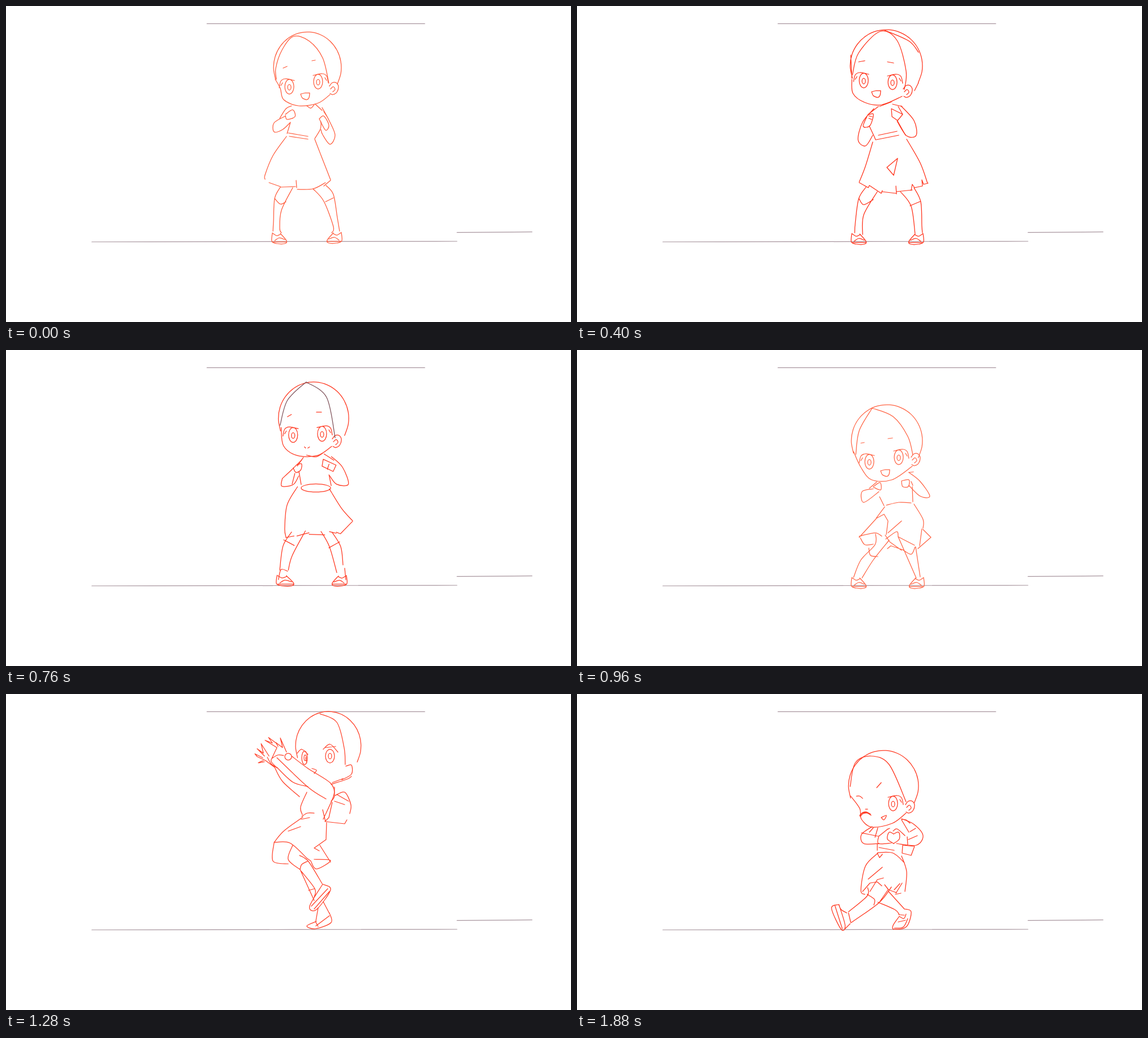
Write an HTML page that moves like this. It is 1001x560 px and loops after 1.92 s.

```html
<!DOCTYPE html>
<html lang="en">
<head>
<meta charset="utf-8">
<title>Dance sketch</title>
<style>
html, body { margin: 0; width: 100%; height: 100%; overflow: hidden; background: #fff; }
svg { display: block; width: 100%; height: 100%; }
path { fill: none; stroke-linecap: round; stroke-linejoin: round; }
#girl path { stroke-width: 1.25; vector-effect: non-scaling-stroke; }
#guides { stroke: #a8959e; stroke-width: 1.2; }
</style>
</head>
<body>
<svg viewBox="0 0 1001 560">
  <path id="guides" d="M356 31.3H742M152 418L799 417M799 401.3L932 400.3"/>
  <g id="girl"></g>
</svg>
<script>
// Strokes are split by "|": a smooth curve through points,
// "^" for straight segments, "o" for an ellipse (cx cy rx ry).
const EYE = '-18 2 -15 -10 -7 -14 9 -11|-15 -2 -12 -7|o0 0 8 13|o0 1 3 5';
const EAR = '-8 -5 -3 -11 4 -11 8 -4 5 6 -2 10 -7 8|-6 0 -1 -4 2 1 -2 5';
const MOUTH = '^-8 0 0 -2 8 -2|8 -2 7 6 3 10 -5 7 -8 0';
const SHOE = '0 -19 -1 -4 8 0 22 0 25 -5 14 -18|1 -18 8 -14 15 -17|1 -3 25 -3|4 -5 12 -10 22 -7';

const place = (spec, dx, dy, flip = 1) => spec.split('|').map(stroke => {
  let n = 0;
  return stroke.replace(/-?[\d.]+/g, v => {
    const i = n++;
    if (stroke[0] === 'o' && i > 1) return v;
    return i % 2 ? +v + dy : v * flip + dx;
  });
}).join('|');

// Skull outline, open at the jaw.
function dome(cx, cy, rx, ry) {
  const pts = [];
  for (let deg = 28; deg >= -200; deg -= 19) {
    const a = deg * Math.PI / 180;
    pts.push((cx + rx * Math.cos(a)).toFixed(1), (cy + ry * Math.sin(a)).toFixed(1));
  }
  return pts.join(' ');
}

const parts = ['head', 'hair', 'face', 'torso', 'armL', 'armR', 'skirt', 'legL', 'legR'];

class Pose {
  constructor(ink, hairInk = ink) { Object.assign(this, { ink, hairInk }); }
  add(part, ...specs) { this[part] = specs.join('|'); }
}

const wide = new Pose('#ff5c3c');
wide.add('head', dome(534, 109, 60, 63), '477 130 486 146 492 166 519 177 553 172 574 157', place(EAR, 581, 147));
wide.add('hair', '479 130 478 110 489 78 509 54 537 62 561 92 572 137');
wide.add('face', place(EYE, 502, 143), place(EYE, 553, 134, -1), place(MOUTH, 530, 156), '491 110 498 107|542 97 548 96');
wide.add('torso', '533 177 540 181 546 175|548 174 560 185|504 206 498 226|558 205 557 218 547 235|500 225 535 231|502 231 535 236');
wide.add('armL', '506 177 496 182 485 199|495 195 475 207 475 223 490 219 503 207|495 194 498 201 512 196 508 184 495 192');
wide.add('armR', '560 180 573 204 583 229 574 245 561 228 558 219|555 200 563 195 572 211 566 220 555 200|563 187 570 198');
wide.add('skirt', '497 231 473 265 459 299 459 307|466 313 486 320|486 321 513 320|514 309 515 322|516 325 544 324 566 313|563 319 575 309|547 236 559 267 575 308');
wide.add('legL', '486 321 476 341 474 380 473 399|508 322 488 362 485 394 488 402|476 341 486 351 496 347', place(SHOE, 472, 421));
wide.add('legR', '567 318 580 334 587 375 591 399|544 324 563 346 580 391 577 402|566 347 580 340', place(SHOE, 594, 420, -1));

const sway = new Pose('#ff3018');
sway.add('head', dome(548, 106, 64, 64), '487 130 489 155 510 171 540 175 576 160', place(EAR, 586, 152), '605 136 598 150|487 128 485 87|545 43 588 62 605 82');
sway.add('hair', '488 122 499 83 537 45 567 61 583 115 580 148');
sway.add('face', place(EYE, 508, 132), place(EYE, 559, 135, -1), place(MOUTH, 530, 152), '499 99 510 97|550 99 561 101');
sway.add('torso', '536 178 557 170|559 174 576 178|534 178 516 192|518 213 526 230 529 237|568 204 582 229|534 229 567 222|530 237 570 229');
sway.add('armL', '526 182 506 206 498 237 511 248 524 229|515 193 507 213 519 212 525 192 516 193|517 195 523 196|517 199 522 201');
sway.add('armR', '574 177 597 203 601 229 584 230 567 204|^557 182 577 192 568 203 558 196 557 182|569 178 577 192');
sway.add('skirt', '524 241 511 284 500 312|^500 313 516 322 518 318 539 332 541 327|540 329 565 332|565 319 566 333|566 329 594 326|^592 327 594 316 598 322 612 319 611 308 614 316 622 314|584 236 608 278 621 314|^568 270 549 286 561 300 568 270');
sway.add('legL', '512 321 499 342 493 385 492 402|532 329 508 370 506 405|500 342 508 352 525 343', place(SHOE, 487, 422));
sway.add('legR', '597 322 609 347 611 390 612 402|573 329 592 355 599 404|590 354 609 346', place(SHOE, 613, 422, -1));

const tall = new Pose('#ff3820', '#7d5058');
tall.add('head', dome(543, 102, 62, 64), '486 118 490 150 514 167 550 167 575 151', place(EAR, 584, 143));
tall.add('hair', '484 114 497 70 530 38|530 38 566 65 581 136');
tall.add('face', place(EYE, 507, 131), place(EYE, 558, 129, -1), '497 99 504 95|548 91 557 91|527 152 529 154|533 154 536 152');
tall.add('torso', '524 171 541 174 553 168|518 175 507 190|556 169 574 180|510 200 514 222|565 205 569 224|o541 228 27 7');
tall.add('armL', '518 176 500 195 482 213|482 213 481 228 502 225 512 208|507 187 517 184 516 196 507 201 502 192|505 203 500 224');
tall.add('armR', '569 176 588 196 598 228 578 228 566 212|^555 181 577 192 572 204 553 194 555 181|565 190 562 200');
tall.add('skirt', '513 228 495 262 491 305 493 321|493 322 507 319|512 319 533 313|533 316 560 317|568 311 580 314|^580 312 587 315 608 292|568 232 589 268 608 291');
tall.add('legL', '499 320 486 345 481 388|520 318 500 362 494 388|487 334 503 344', place(SHOE, 477, 416), '479 405 483 387 493 390');
tall.add('legR', '573 319 588 345 592 378|553 317 568 345 581 392|567 347 586 336', place(SHOE, 598, 416, -1), '597 405 595 384');

const crouch = new Pose('#ff6444');
crouch.add('head', dome(549, 161, 63, 64), '490 180 503 208 522 230 558 230 594 206', place(EAR, 600, 195));
crouch.add('hair', '494 185 500 143 523 103|523 103 560 118 586 153 595 186');
crouch.add('face', place(EYE, 518, 198), place(EYE, 570, 190, -1), place(MOUTH, 546, 214), '503 165 509 164|551 157 559 156');
crouch.add('torso', '588 217 596 216|594 242 595 269|536 260 544 276|548 275 570 270 592 271');
crouch.add('armL', '531 234 518 245|525 246 505 251 508 270 535 251|525 242 537 235 538 248 525 243');
crouch.add('armR', '588 217 608 233 625 259 608 259 588 240|575 232 588 230 587 242 577 242 575 232|592 233 595 240');
crouch.add('skirt', '545 278 530 298|530 299 500 332|500 330 528 324 540 330|^531 298 544 291 551 303 548 327|502 333 510 345 525 344|551 324 575 303|^546 328 554 340 575 355|597 273 613 300 613 316|^613 318 627 332 604 352|611 317 607 347|547 335 566 322 569 330|^550 352 556 347 577 354|569 331 598 346');
crouch.add('legL', '529 326 528 345 503 372 490 403|553 337 525 372 505 404|517 351 520 364 533 366', place(SHOE, 487, 422));
crouch.add('legR', '569 331 580 356 601 404|600 349 608 402|577 354 592 362 599 349', place(SHOE, 614, 422, -1));

const reach = new Pose('#ff4028');
reach.add('head', dome(571, 92, 58, 61), '576 160 604 151 612 146', '578 157 597 150', '602 128 612 126 612 142 595 152');
reach.add('hair', '556 35 586 50 599 95 601 125');
reach.add('face', '516 105 524 98 535 107|o529 113 5 12|o530 113 2 5|531 113 533 122', '562 98 574 89 588 103|565 95 584 93|o574 110 8 12|o574 110 3 5', '542 132 550 135 546 141');
reach.add('torso', '533 174 522 200 525 214|582 165 580 182 562 222|524 217 534 211 546 211', '583 180 600 174 611 196 609 212|586 178 607 190|582 190 600 196|578 192 572 219|^572 219 565 226 600 230 604 223|561 205 566 226');
reach.add('armL', '476 130 490 155 520 182|480 130 508 156 535 164|463 112 470 124 481 131', '^476 130 460 118 445 111 441 106 455 113|^458 110 445 97 456 105 452 88 466 110|456 118 447 122 458 120');
reach.add('armR', '506 110 535 132 575 158 582 180 576 190|480 113 535 165 567 186|471 114 482 108 492 109|o500 111 6 6', '^497 103 486 78 490 95 478 86 482 93|^480 88 465 77 472 87 459 82 480 95 471 114|471 114 470 120 480 131');
reach.add('skirt', '526 218 492 243 475 263|523 222 538 219|^522 235 500 243|475 263 503 264 533 291|568 228 567 258|^567 258 546 273 555 278|556 268 575 298', '546 293 575 295 550 310 540 296|475 263 473 296 500 301|^533 291 540 296');
reach.add('legL', '508 268 500 293 521 311|520 286 536 297 560 336|521 311 524 302 535 296|521 311 546 366|523 314 547 345 546 360|536 348 547 345', '561 337 538 376 550 382 575 347 561 337|541 376 570 345|546 381 573 350');
reach.add('legR', '553 379 549 402|562 368 573 389|573 388 576 405 548 416 533 411 550 403|549 411 573 393|548 403 553 412');

const lid = '508 231 513 226 520 225 527 229';
const wink = [lid, place(lid, 0, 1), place(lid, 1, 2), '518 220 522 220', place(EYE, 567, 210, -1)].join('|');
const heart = new Pose('#ff3018');
heart.add('head', dome(550, 179, 62, 63), '492 197 508 219 511 238 530 252 566 245 590 227', place(EAR, 597, 217));
heart.add('hair', '491 180 500 138 528 126 560 141 590 207');
heart.add('face', wink, '502 191 515 194|^536 178 541 169', '540 237 554 231 549 243 540 237');
heart.add('torso', '^580 240 587 237 596 242|529 286 528 294|^581 284 580 295 596 293 597 287|540 253 536 272|533 252 526 260');
heart.add('armL', '532 254 513 268 517 284 545 284|513 265 542 271|545 270 560 258|544 270 543 284 566 283', '570 284 559 276 562 264 570 267|557 260 563 257');
heart.add('armR', '584 240 606 250 622 270 610 287 575 284|570 267 579 264 580 276 570 284|569 262 576 258 590 270|584 242 597 264|596 277 612 270|599 263 609 257|594 272 595 286');
heart.add('skirt', '528 293 562 293 579 296|526 295 497 312 474 324 481 344|485 347 504 353|505 353 520 325 545 328|498 356 517 338', '^541 326 561 340 553 347|578 296 592 320 603 348|603 348 585 363 574 363|562 347 574 363');
heart.add('legL', '517 343 516 358 483 386|^521 350 534 329 545 326|559 342 537 370 488 405|516 355 529 364 528 374|^537 370 553 347', '483 388 487 405|466 373 453 380 470 417 477 410 466 373|459 375 472 416|466 374 470 382 480 388|477 416 486 407');
heart.add('legR', '552 350 580 381|533 369 563 382 571 391|580 381 592 386 584 412 562 417 560 410 571 394|562 415 578 413 586 398|571 394 579 398 583 390|569 404 582 401|570 391 580 392');

const rise = new Pose('#ff3820');
rise.add('head', place(heart.head, -7, -16));
rise.add('hair', place(heart.hair, -7, -16));
rise.add('face', place(wink, -7, -16), '495 181 501 181 506 185|531 166 539 157|539 219 548 215 544 223 539 219');
rise.add('torso', '^575 222 583 223 590 229|533 237 528 254|525 237 518 245|^577 268 576 282 592 286 598 270 577 268|532 266 532 277|535 272 562 277');
rise.add('armL', place(heart.armL, -9, -19));
rise.add('armR', place(heart.armR, -9, -19));
rise.add('skirt', '533 282 511 305 503 348 510 355|^532 282 536 290 541 284|516 328 541 307|^506 350 519 335 532 333 540 340|^545 338 552 347 566 352', '533 281 560 282 580 299|575 287 584 315 581 350|^562 347 572 336|^565 353 576 335|^564 355 574 353');
rise.add('legL', place(heart.legL, -2, 0));
rise.add('legR', heart.legR);

function trace(spec) {
  const xs = [], ys = [];
  const d = spec.split('|').map(stroke => {
    const nums = stroke.match(/-?[\d.]+/g).map(Number);
    if (stroke[0] === 'o') {
      const [cx, cy, rx, ry] = nums;
      return `M${cx - rx} ${cy}a${rx} ${ry} 0 1 1 ${2 * rx} 0a${rx} ${ry} 0 1 1 ${-2 * rx} 0`;
    }
    const pts = [];
    for (let i = 0; i < nums.length; i += 2) {
      pts.push([nums[i], nums[i + 1]]);
      xs.push(nums[i]);
      ys.push(nums[i + 1]);
    }
    if (stroke[0] === '^') return 'M' + pts.join('L');
    const at = i => pts[Math.max(0, Math.min(pts.length - 1, i))];
    const handle = (i, s) => [0, 1].map(k => at(i)[k] + s * (at(i + 1)[k] - at(i - 1)[k]) / 6);
    return 'M' + pts[0] + pts.slice(1).map((p, i) => `C${handle(i, 1)} ${handle(i + 1, -1)} ${p}`).join('');
  }).join('');
  const x = Math.min(...xs), y = Math.min(...ys);
  return { d, box: [x, y, Math.max(...xs) - x, Math.max(...ys) - y] };
}

for (const pose of [wide, sway, tall, crouch, reach, heart, rise]) {
  pose.parts = parts.map(name => trace(pose[name]));
  pose.parts[1].box = pose.parts[2].box = pose.parts[0].box; // hair and face ride on the head
}

// time, pose, vertical bob on the way to the next key
const keys = [
  [0, wide, 0], [40, wide, 8], [400, sway, 0], [480, sway, -5], [640, tall, 0],
  [960, crouch, 0], [1280, reach, 0], [1360, reach, 0], [1600, heart, 0], [1880, rise, 0], [1920, rise, 0]
];
const held = new Set([800, 880, 1080, 1120, 1680]);
const LOOP = 1920, STEP = 40;

const paths = parts.map(() => document.getElementById('girl').appendChild(
  document.createElementNS('http://www.w3.org/2000/svg', 'path')));

function draw(t) {
  const k = keys.findIndex((key, i) => t < keys[i + 1][0]);
  const [t0, from, bob] = keys[k], [t1, to] = keys[k + 1];
  const u = (t - t0) / (t1 - t0), p = u * u * (3 - 2 * u);
  const pose = p < 0.5 ? from : to;
  const dip = bob * Math.sin(Math.PI * p);
  parts.forEach((name, i) => {
    const { d, box } = pose.parts[i];
    const a = from.parts[i].box, b = to.parts[i].box;
    const [x, y, w, h] = a.map((v, n) => v + (b[n] - v) * p);
    const sx = w / box[2], sy = (name.startsWith('leg') ? h - dip : h) / box[3];
    const path = paths[i];
    path.setAttribute('d', d);
    path.setAttribute('stroke', name === 'hair' ? pose.hairInk : pose.ink);
    path.setAttribute('transform', `matrix(${sx} 0 0 ${sy} ${x - sx * box[0]} ${y + dip - sy * box[1]})`);
  });
}

const start = performance.now();
let shown = -1;
function tick() {
  const now = (performance.now() - start) % LOOP;
  let t = Math.floor(now / STEP) * STEP;
  while (held.has(t)) t -= STEP;
  if (t !== shown) draw(shown = t);
  requestAnimationFrame(tick);
}
tick();
</script>
</body>
</html>
```
